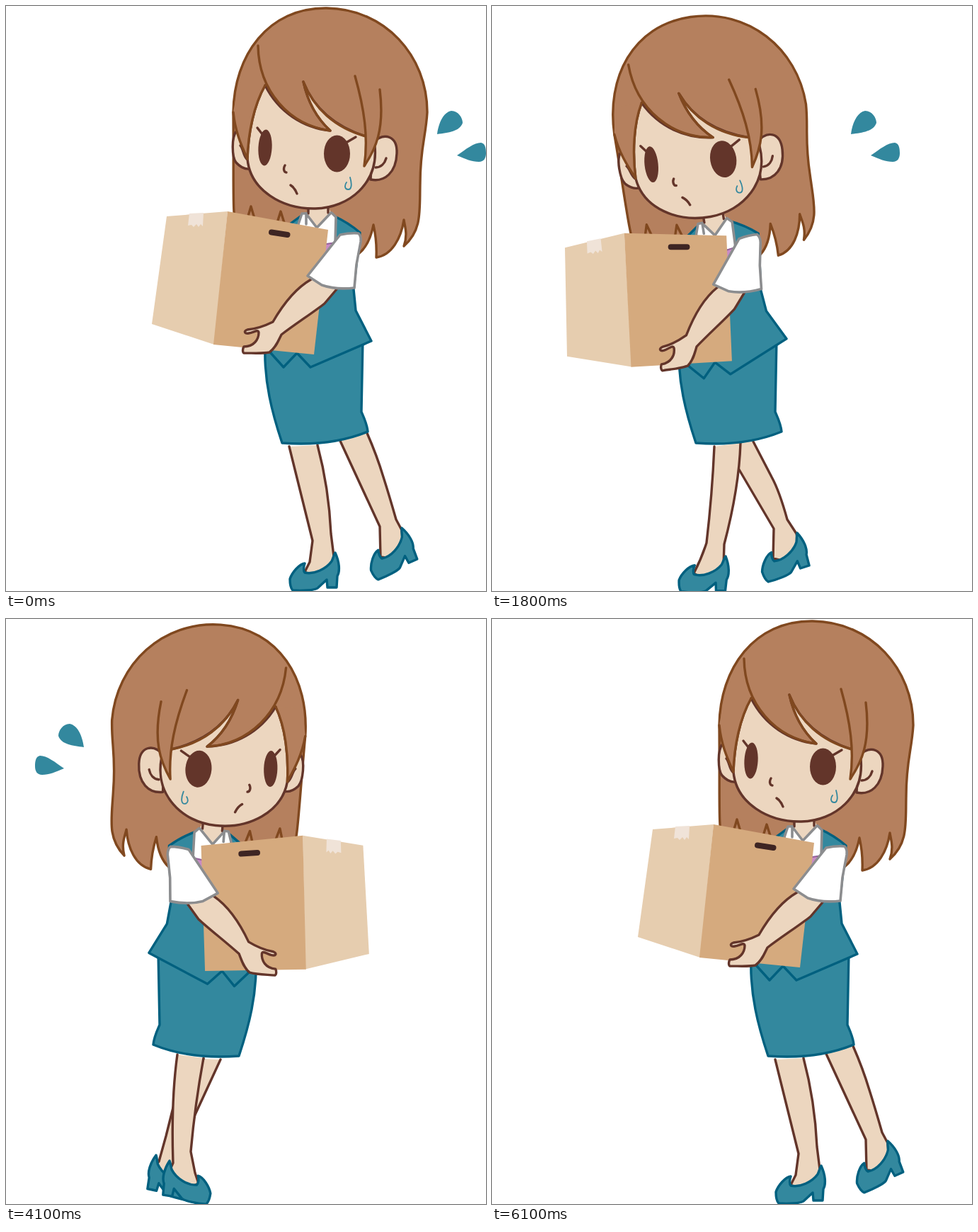
Animation, 678 px wide and 826 px high, one loop 6.4 s. Source, as an HTML page:

```html
<!DOCTYPE html>
<html lang="en">
<head>
<meta charset="utf-8">
<title>Carrying a heavy box</title>
<style>
  html, body { margin: 0; width: 100%; height: 100%; overflow: hidden; background: #fff; }
  svg { display: block; width: 100%; height: 100%; }
  path, ellipse { stroke-linecap: round; stroke-linejoin: round; }
  .skin { fill: #ecd6bf; stroke: #63352a; stroke-width: 3.4; }
  .hair { fill: #b5805e; stroke: #80481f; stroke-width: 3.4; }
  .cloth { fill: #33889e; stroke: #00607f; stroke-width: 3.4; }
  .white { fill: #fff; stroke: #8c8d8f; stroke-width: 3.6; }
  .line { fill: none; }
  .plain { stroke: none; }
  .eye { fill: #63352a; }
</style>
</head>
<body>
<svg viewBox="0 0 678 826">
  <defs>
    <!-- origin at the top of the heel -->
    <path id="shoe" class="cloth" d="M-43 15C-51 16-61 28-64 37C-64 44-63 50-60 53C-47 54-29 53-25 50L-12 38L-11 49L2 49L3 33C7 26 6 13 0 0C-2 3-3 8-5 12C-13 23-30 31-43 28C-45 26-45 20-43 15Z"/>
  </defs>
  <g id="woman">
    <g id="legs-stride">
      <path class="skin" d="M472 614L528 735L529 778L545 780L560 752L559 740L551 725Q541 690 533 665Q524 635 510 603"/>
      <use href="#shoe" transform="translate(559 737) rotate(-24)"/>
      <path class="skin" d="M400 622L433 755L429 785L422 799L440 808L464 785L459 745Q456 680 440 620"/>
      <use href="#shoe" transform="translate(465 772)"/>
    </g>
    <g id="legs-pass">
      <path class="skin" d="M416 622L452 700L476 775L472 793L490 798L507 770L503 766L493 730L483 690L470 660L440 621"/>
      <use href="#shoe" transform="translate(507 757) rotate(-12)"/>
      <path class="skin" d="M440 620Q452 685 458 752L452 782L447 797L467 806L488 779L483 768Q486 680 477 615"/>
      <use href="#shoe" transform="translate(488 765) rotate(-8.5)"/>
    </g>
    <g id="legs-cross">
      <path class="skin" d="M450 617L446 646L500 738L499 780L524 786L535 758L532 745L519 725Q508 685 497 665L471 615"/>
      <use href="#shoe" transform="translate(533 744) rotate(-18)"/>
      <path class="skin" d="M416 622Q413 690 405 758Q398 780 387 801L405 812L429 791L430 760Q451 680 453 617"/>
      <use href="#shoe" transform="translate(432 777) rotate(3)"/>
    </g>

    <path class="cloth" d="M366 478C364 530 376 575 390 617C430 620 472 617 511 601C510 590 505 580 502 573L504 470"/>

    <g id="upper">
      <path class="hair" d="M453 3C535 4 595 70 595 150C593 185 585 200 585 250C584 290 588 316 562 339C568 322 563 310 562 302C558 328 545 352 523 355C524 335 521 318 519 309C515 330 508 342 498 350L420 350L326 330C319 290 322 250 321 150C322 70 370 2 453 3Z"/>
      <path class="hair line" d="M341 300L346 283L351 300M383 306L388 290L393 306"/>

      <path class="cloth" d="M398 310L420 294L462 296Q484 306 500 320L491 400L494 430L516 473L430 510L411 490L392 510L374 490Z"/>
      <path class="white" d="M413 308L418 293L460 292L466 298L465 336L420 340Z"/>
      <path class="skin plain" d="M426 282L426 294L439 313L459 292L455 282Z"/>
      <path class="skin line" d="M427 284V293M455 284V292"/>
      <path class="white line" d="M424 293L424 308M426 296L439 313L459 292"/>
      <path d="M446 337L466 334L450 356Z" fill="#c98bc6" stroke="#936199" stroke-width="2"/>

      <path class="skin" d="M518 193C535 177 553 184 552 208C551 235 535 249 515 245Z"/>
      <path class="skin line" d="M522 228C530 228 535 222 537 215"/>
      <path class="skin" d="M326 176C318 185 319 213 325 221Q334 231 344 230L341 190Z"/>
      <path class="skin line" d="M331 197C335 201 335 211 340 216"/>

      <path class="skin" d="M366 112C385 150 420 172 458 176C435 155 425 130 420 107C435 145 465 170 508 184L521 198C526 250 485 285 437 286C390 287 345 260 341 216C342 180 350 140 366 112Z"/>
      <path class="hair plain" d="M321 150C324 180 334 200 341 216C342 180 350 140 366 112L328 112ZM508 184C509 200 508 215 506 226C522 202 534 170 528 118L494 120Z"/>
      <path class="hair line" d="M321 150C324 180 334 200 341 216C342 180 350 140 366 112M356 56C357 120 400 168 458 176C435 155 425 130 420 107C435 145 465 172 508 184M493 99C506 145 512 185 506 226C522 202 535 175 528 118"/>

      <g id="open-eyes">
        <ellipse class="eye" cx="366" cy="200" rx="9.6" ry="25.5" transform="rotate(3 366 200)"/>
        <ellipse class="eye" cx="467.5" cy="208.5" rx="18.5" ry="26"/>
        <path class="skin line" d="M355 172L362 181M482 192L494 185"/>
      </g>
      <path id="closed-eyes" class="skin line" d="M354 206Q366 220 378 207M448 212Q468 231 487 212"/>
      <path class="skin line" d="M394 225C391 230 393 235 396 235M402 253Q408 257 411 265"/>
      <path class="line" stroke="#33889e" stroke-width="1.8" d="M486 242C489 252 488 259 483.500 259C478 259 478 253 481 249"/>

      <path fill="#e6cdaf" d="M227 297L313 290L294 478L206 449Z"/>
      <path fill="#d5aa7e" d="M313 290L455 316L435 492L293 478Z"/>
      <path fill="#f0e3d8" d="M259 293L279 292L278 311L275 308L272 312L269 308L265 312L262 309L257 310Z"/>
      <path class="line" stroke="#3e2523" stroke-width="8" d="M375 319.500L397.500 323"/>

      <path class="skin" d="M431 386C410 398 392 420 377 446C365 452 352 456 341 457C335 459 337 463 343 462C350 461 356 456 357 461C357 471 350 481 336 481C334 484 334 489 336 490C350 490 362 491 372 489C381 483 385 472 389 464C410 448 435 432 450 420L467 400"/>
      <path class="white" d="M472 323Q486 320 498 321Q502 325 501 333L495 365L492 398Q466 401 446 394L426 381Z"/>
    </g>

    <path id="drops" fill="#33889e" d="M609 181C611 165 618 150 629 148C639 148 645 158 645 165C641 177 625 179 609 181ZM637 211C650 202 661 193 671 193C677 194 678 201 678 208C678 215 675 220 668 220C658 220 649 216 637 211Z"/>
    <path id="sigh" fill="#fff" stroke="#8c8d8f" stroke-width="2.500" d="M380 276C376 288 374 292 369 296C374 306 366 314 358 312C353 323 341 323 338 315C328 314 325 303 332 299C329 289 340 284 347 288C352 281 360 283 363 287Q372 285 380 276Z"/>
  </g>
</svg>
<script>
  const LOOP = 6400;
  const MIRROR = 679;
  const LEAN = { stride: 0, pass: -4.7, cross: -9 };
  const LEFT = 1, RIGHT = -1;

  // start time, pose, horizontal shift, direction, extras
  const STEPS = [
    [0, "stride", 0, LEFT, "drops"],
    [300, "pass", -10, LEFT, ""],
    [600, "cross", -19.5, LEFT, "drops"],
    [900, "pass", -46, LEFT, ""],
    [1200, "stride", -81, LEFT, "drops"],
    [1500, "pass", -89, LEFT, ""],
    [1800, "cross", -102, LEFT, "drops"],
    [2100, "pass", -165, LEFT, ""],
    [2400, "stride", -206, LEFT, "drops"],
    [2700, "stride", -206, LEFT, "closed"],
    [3000, "stride", -206, LEFT, "closed sigh"],
    [3500, "stride", -206, LEFT, ""],
    [3800, "stride", 0, RIGHT, ""],
    [4100, "pass", 40, RIGHT, "drops"],
    [4400, "cross", 91, RIGHT, ""],
    [4700, "pass", 165, RIGHT, "drops"],
    [5000, "stride", 206, RIGHT, ""],
    [5300, "stride", 206, RIGHT, "closed"],
    [5600, "stride", 206, RIGHT, "closed sigh"],
    [6100, "stride", 0, LEFT, ""]
  ];

  const part = id => document.getElementById(id);
  const show = (id, visible) => part(id).style.display = visible ? "" : "none";

  function draw(time) {
    const [, pose, shift, facing, extras] = STEPS.findLast(step => step[0] <= time);
    const x = facing === LEFT ? shift : MIRROR + shift;
    part("woman").setAttribute("transform", `translate(${x} 0) scale(${facing} 1)`);
    part("upper").setAttribute("transform", `rotate(${LEAN[pose]} 497 459)`);
    for (const name in LEAN) show("legs-" + name, name === pose);
    const closed = extras.includes("closed");
    show("open-eyes", !closed);
    show("closed-eyes", closed);
    show("sigh", extras.includes("sigh"));
    show("drops", extras.includes("drops"));
  }

  function tick() {
    draw(performance.now() % LOOP);
    requestAnimationFrame(tick);
  }
  tick();
</script>
</body>
</html>
```
